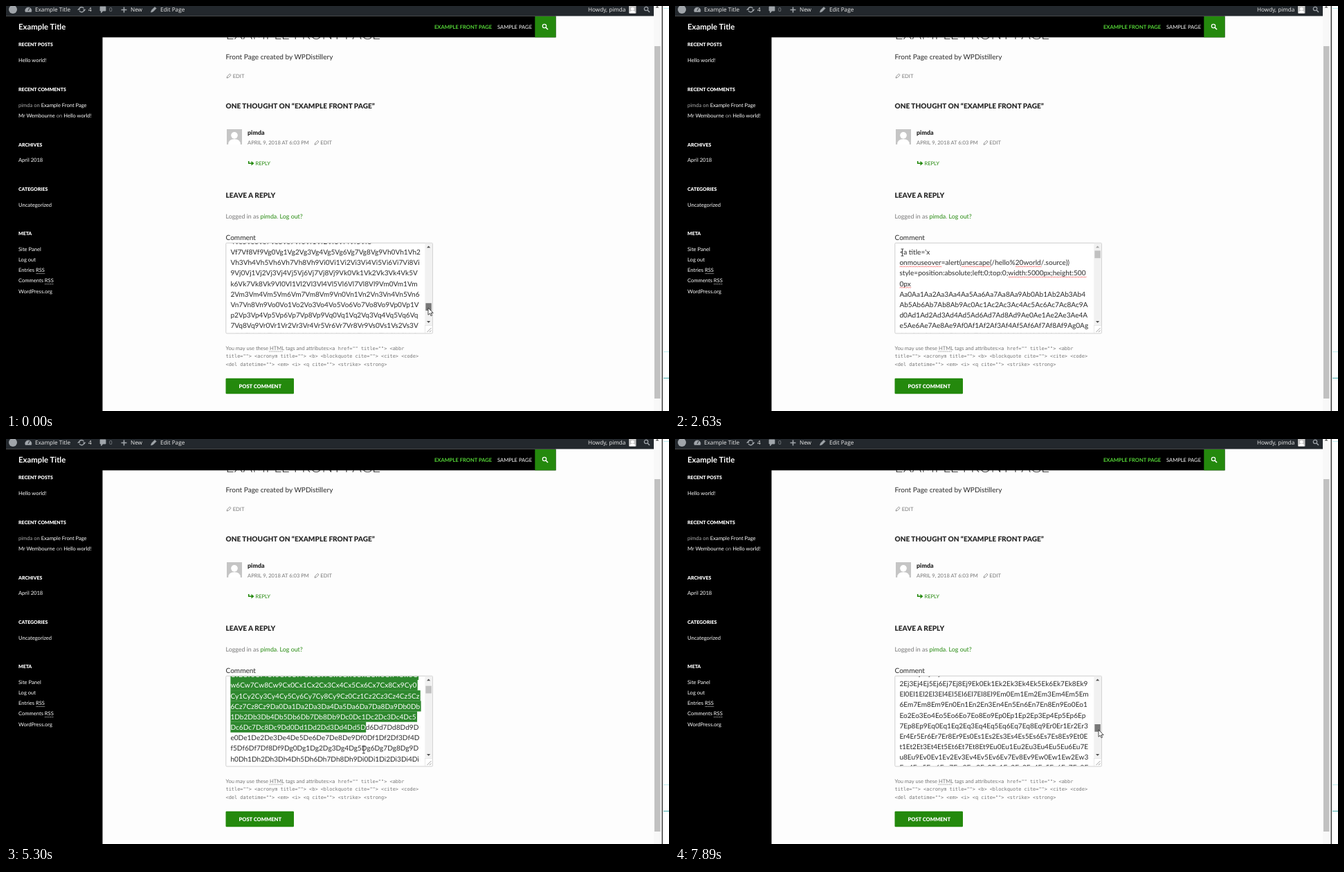
An HTML page for the animation above (8000 ms loop, 958 by 585 pixels).

```html
<!DOCTYPE html>
<html lang="en">
<head>
<meta charset="utf-8">
<title>Comment form</title>
<style>
html, body { margin: 0; width: 100%; height: 100%; overflow: hidden; background: #fdfdfd; }
svg { display: block; font-family: Lato, sans-serif; text-rendering: geometricPrecision; }
text { white-space: pre; }
.ui { font-family: "Open Sans", sans-serif; }
.mono { font-family: "DejaVu Sans Mono", monospace; font-size: 6.92px; }
</style>
</head>
<body>
<svg width="958" height="585" viewBox="0 0 958 585">
  <defs><clipPath id="box"><rect x="318" y="342.7" width="287.5" height="129.6"/></clipPath></defs>
  <g id="page"></g>
  <g id="lines" clip-path="url(#box)" font-size="10.11"></g>
  <g id="bar"></g>
  <g id="cursor"></g>
</svg>
<script>
const $ = id => document.getElementById(id);
const GREEN = '#24890d', GREY = '#767676', DARK = '#2b2b2b', USER = 'pimda';
const esc = s => s.replace(/&/g, '&amp;').replace(/</g, '&lt;');
const rect = (x, y, w, h, fill, more = '') => `<rect x="${x}" y="${y}" width="${w}" height="${h}" fill="${fill}" ${more}/>`;
const path = (d, color, width = 1, fill = 'none') => `<path d="${d}" stroke="${color}" stroke-width="${width}" fill="${fill}"/>`;
const text = (x, y, size, fill, body, more = '') => `<text x="${x}" y="${y}" font-size="${size}" fill="${fill}" ${more}>${body}</text>`;
const span = (fill, body) => `<tspan fill="${fill}">${body}</tspan>`;
const BOLD = 'font-weight="700"', BLACK = 'font-weight="900"', UI = 'class="ui"';

// ---------- static page ----------
const pencil = (x, y, c) => path(`M${x - 3} ${y + 3}l.8-2.4 3.6-3.6 1.7 1.7-3.6 3.6z`, c, .8);
const lens = (x, y, c) => `<circle cx="${x}" cy="${y}" r="2.7" fill="none" stroke="${c}" stroke-width="1.2"/>` +
  path(`M${x + 2} ${y + 2}l3 3`, c, 1.6);
const person = (x, y, s) => rect(x, y, s, s, '#c5c5c5') +
  `<circle cx="${x + s / 2}" cy="${y + s * .4}" r="${s * .22}" fill="#fff"/>` +
  `<path d="M${x + s * .1} ${y + s}q0-${s * .35} ${s * .4}-${s * .35}t${s * .4} ${s * .35}z" fill="#fff"/>`;
const dots = (x, y, w, c) => `<path d="M${x} ${y}h${w}" stroke="${c}" stroke-width=".7" stroke-dasharray="1 .6"/>`;

function page() {
  const side = [
    [58.4, 'RECENT POSTS'], [81, 'Hello world!'],
    [122.8, 'RECENT COMMENTS'], [145.6, span('#aaa', USER + ' on ') + 'Example Front Page'],
    [160.8, 'Mr Wembourne' + span('#aaa', ' on ') + 'Hello world!'],
    [202.5, 'ARCHIVES'], [225.2, 'April 2018'], [266.8, 'CATEGORIES'], [289.6, 'Uncategorized'],
    [331.4, 'META'], [354, 'Site Panel'], [369.1, 'Log out'], [384.3, 'Entries RSS'],
    [399.4, 'Comments RSS'], [414.6, 'WordPress.org']
  ].map(([y, s]) => /^[A-Z ]+$/.test(s) ? text(18, y, 6.95, '#fff', s, BLACK) : text(18, y, 7.58, '#fff', s)).join('');

  return text(317.5, 48, 20.86, DARK, 'EXAMPLE FRONT PAGE', 'font-weight="300"') +
    rect(0, 0, 936, 14.5, '#23282d') + rect(0, 14.5, 794.5, 30.8, '#000') + rect(0, 45, 139.5, 540, '#000') +
    // toolbar
    '<circle cx="10" cy="5" r="6" fill="#a0a5aa"/>' +
    path('M28 8.5a4.7 4.7 0 1 1 8.6 0z', '#a0a5aa', .5, '#a0a5aa') + path('M32 7l2-4', '#23282d', 1) +
    text(42, 8.4, 8.2, '#eee', 'Example Title', UI) +
    path('M105.5 5a3.8 3.8 0 0 1 7-1.5M113 5.5a3.8 3.8 0 0 1-7 1.5', '#a0a5aa', 1.4) +
    path('M111 4.8h4.4l-2.2 2.6zM103 5.8h4.4l-2.2-2.6z', 'none', 0, '#a0a5aa') +
    text(119, 8.4, 8.2, '#eee', '4', UI) +
    path('M136 1h8v6h-4l-2.5 3v-3h-1.5z', '#a0a5aa', .8, '#a0a5aa') + text(149, 8.4, 8.2, '#8b8f93', '0', UI) +
    path('M166.5 5.5h8M170.5 1.5v8', '#a0a5aa', 1.6) + text(180, 8.4, 8.2, '#eee', 'New', UI) +
    path('M209.5 9l1-3 4.5-4.5 2 2-4.5 4.5z', '#a0a5aa', .8, '#a0a5aa') + text(223, 8.4, 8.2, '#eee', 'Edit Page', UI) +
    text(841, 8.4, 8.2, '#eee', 'Howdy, ' + USER, UI) + person(900, 0, 10.5) + lens(925, 4, '#a0a5aa') +
    // header
    text(18, 34.3, 11.37, '#fff', 'Example Title', BOLD) +
    text(619, 32.8, 7.58, '#55d737', 'EXAMPLE FRONT PAGE', BOLD) + text(710, 32.8, 7.58, '#fff', 'SAMPLE PAGE') +
    rect(764.3, 15, 30.2, 30.3, GREEN) + lens(778, 29, '#fff') + side +
    dots(43.5, 386.5, 13, '#fff') + dots(56, 401.6, 13, '#fff') +
    // entry and thread
    text(317.5, 77.2, 10.11, DARK, 'Front Page created by WPDistillery') +
    pencil(322, 101, GREY) + text(327.7, 104, 7.58, GREY, 'EDIT') +
    text(317.5, 148.2, 10.11, DARK, 'ONE THOUGHT ON “EXAMPLE FRONT PAGE”', BLACK) +
    person(319, 178, 22) + text(349, 185.6, 8.85, DARK, USER, BLACK) +
    text(349, 200, 7.58, GREY, 'APRIL 9, 2018 AT 6:03 PM') + pencil(449, 197.3, GREY) + text(454.3, 200, 7.58, GREY, 'EDIT') +
    path('M350.7 224v3.2h5', GREEN, 1.6) + path('M354.5 224l4 3.2-4 3.2z', 'none', 0, GREEN) +
    text(360.4, 230.4, 7.58, GREEN, 'REPLY') +
    // reply form
    text(317.5, 277, 10.11, DARK, 'LEAVE A REPLY', BLACK) +
    text(317.5, 306.6, 8.85, GREY, `Logged in as ${span(GREEN, USER)}. ${span(GREEN, 'Log out?')}`) +
    text(317.5, 337.8, 10.11, DARK, 'Comment') +
    rect(317.8, 342.3, 298.7, 130.6, '#fff', 'stroke="#c4c4c4" stroke-width=".8" rx="1.3"') +
    text(317.5, 496.8, 7.58, GREY, 'You may use these HTML tags and attributes:') + dots(380, 499, 20, GREY) +
    text(467.2, 496.8, 6.92, GREY, esc('<a href="" title=""> <abbr'), 'class="mono"') +
    text(317.5, 508.2, 6.92, GREY, esc('title=""> <acronym title=""> <b> <blockquote cite=""> <cite> <code>'), 'class="mono"') +
    text(317.5, 519.6, 6.92, GREY, esc('<del datetime=""> <em> <i> <q cite=""> <strike> <strong>'), 'class="mono"') +
    rect(317.5, 537.8, 98.5, 22.4, GREEN, 'rx="1.2"') + text(336.4, 551.6, 7.58, '#fff', 'POST COMMENT', BLACK) +
    // window edge
    rect(936, 0, 11, 585, '#f8f8f8') + rect(937, 58, 8.5, 509, '#c1c1c1') +
    path('M938.6 2.5l2.4-2.4 2.4 2.4z', 'none', 0, '#505050') +
    rect(947.6, 0, 1.4, 585, '#333') + rect(949, 0, 9, 585, '#fff') +
    path('M950 3.5h8M950 499.5h8', '#bfeef0', 1) + path('M950 537.5h8', '#4aa', 1);
}

// ---------- comment text ----------
const LINE = 15.168, LEFT = 324.4, TOP = 347.7, MAXW = 275.2;
const pen = document.createElement('canvas').getContext('2d');
pen.font = '160px Lato, sans-serif';
const cache = {};
const raw = s => cache[s] ??= pen.measureText(s).width * 10.11 / 160;
const step = (s, i) => i + 1 < s.length ? raw(s[i] + s[i + 1]) - raw(s[i + 1]) : raw(s[i]);
const width = s => [...s].reduce((w, _, i) => w + step(s, i), 0);

let cycle = '';
for (let a = 0; a < 26; a++) for (let b = 0; b < 26; b++) for (let n = 0; n < 10; n++)
  cycle += String.fromCharCode(65 + a, 97 + b) + n;
const body = cycle.repeat(4).slice(0, 65400);
const head = ["<a title='x", 'onmouseover=alert(unescape(/hello%20world/.source))',
  'style=position:absolute;left:0;top:0;width:5000px;height:500', '0px'];
const misspelt = [[1, 'onmouseover'], [1, 'unescape'], [1, '20world'], [2, 'width:5000px;height:500'], [3, '0px']];

// Known line starts keep the wrapping in step.
const at = (s, n) => cycle.indexOf(s) + n * cycle.length;
const starts = [at('0Au1', 0), at('1El2', 0), at('Hq8', 0), at('2Ej3', 2), at('Vf7', 2)];
const lines = [...head], rowOf = {};
for (let pos = 0; pos < body.length;) {
  const stop = starts.find(s => s > pos) ?? body.length;
  let w = 0, end = pos;
  while (end < stop && w + raw(body[end]) <= MAXW) w += step(body, end++);
  rowOf[pos] = lines.length;
  lines.push(body.slice(pos, end));
  pos = end;
}
const [rA, rE, rH, rJ, rV] = starts.map(s => rowOf[s]);
const MAXSCROLL = lines.length * LINE - 121;

// ---------- motion: time, scroll, pointer x y, selection x and row ----------
const keys = [
  [0, rV * LINE, 610, 436, 0, -1],
  [1240, (rE + 2) * LINE - 2, 613, 363, 0, -1],
  [1650, 0, 613, 357, 0, -1],
  [2000, 0, 612, 358, 0, -1],
  [2260, 0, 560, 386, 0, -1],
  [2630, 0, 328.5, 356, 0, -1],
  [2700, 0, 328.5, 356, 326, 0],
  [3330, 0, 400, 388, 400, 2.5],
  [3900, 0, 500, 452, 500, 7],
  [4720, rA * LINE, 517.5, 449, 517, rA + 6.01],
  [5750, rE * LINE + 5.2, 516.5, 449, 516, rE + 4.01],
  [6580, rH * LINE + 5.3, 564.5, 420, 514, rH + 7.01],
  [6850, (rH + 18) * LINE, 566, 422, 540, rH + 24],
  [7120, (rH + 18) * LINE, 600, 385, 540, rH + 24],
  [7270, (rH + 24) * LINE, 611, 369, 540, rH + 24],
  [7890, rJ * LINE + 2, 612, 420, 540, rH + 24]
];
const ticks = [0];
for (const [from, to, n] of [[140, 1110, 8], [1240, 2260, 8], [2380, 2630, 3], [2760, 3330, 5], [3480, 4450, 8],
  [4570, 4720, 2], [4840, 5450, 5], [5750, 5910, 2], [6180, 6580, 4], [6710, 7120, 4], [7270, 7890, 5]])
  for (let i = 0; i < n; i++) ticks.push(Math.round(from + (to - from) * i / (n - 1)));

function pose(t) {
  const i = Math.max(1, keys.findIndex(k => k[0] >= t));
  const a = keys[i - 1], b = keys[i], u = (t - a[0]) / (b[0] - a[0]);
  return a.map((v, j) => v + (b[j] - v) * u);
}

function charAt(s, x) {
  let w = 0, i = 0;
  while (i < s.length && w + step(s, i) / 2 < x) w += step(s, i++);
  return i;
}

function wave(x, y, w) {
  let d = `M${x} ${y}`;
  for (let i = 0; i < w / 1.3; i++) d += `l1.3 ${i % 2 ? 1 : -1}`;
  return path(d, '#f33', .6);
}

function drawLines(scroll, selX, selRow) {
  const first = Math.max(0, Math.floor(scroll / LINE) - 1), last = Math.floor(selRow);
  let out = '';
  for (let r = first; r < first + 12 && r < lines.length; r++) {
    const s = lines[r], y = TOP + r * LINE - scroll, base = y + 11.4;
    const n = r < last ? s.length : r > last ? 0 : charAt(s, selX - LEFT);
    if (n) out += rect(LEFT, y, width(s.slice(0, n)) + (r < last ? 1 : 0), LINE + .1, '#2e882e');
    out += text(LEFT, base, 10.11, DARK, n ? span('#fff', esc(s.slice(0, n))) + esc(s.slice(n)) : esc(s));
    for (const [row, word] of misspelt) if (row === r)
      out += wave(LEFT + width(s.slice(0, s.indexOf(word))), base + 2.6, width(word));
  }
  $('lines').innerHTML = out;
}

function drawBar(scroll, held) {
  const y = 353.4 + 86.4 * scroll / MAXSCROLL;
  $('bar').innerHTML = rect(605.3, 342.7, 10.8, 118.8, '#f1f1f1') +
    path('M608 349.3l2.6-2.8 2.6 2.8z', 'none', 0, scroll > 1 ? '#505050' : '#a3a3a3') +
    path('M608 454.9l2.6 2.8 2.6-2.8z', 'none', 0, '#505050') +
    rect(606.4, y, 8.4, 10.8, held ? '#787878' : '#c1c1c1') +
    rect(605.3, 461.5, 10.8, 10.8, '#fff', 'stroke="#ddd" stroke-width=".6"') +
    path('M608.5 471l6-6M612 471l2.5-2.5', '#888', .8);
}

function drawCursor(x, y) {
  $('cursor').innerHTML = x > 604
    ? path(`M${x} ${y}v10.2l2.4-2.2 1.6 3.6 1.6-.7-1.6-3.5h3.2z`, '#222', .8, '#fff')
    : path(`M${x - 2} ${y - 5}h4M${x} ${y - 5}v10M${x - 2} ${y + 5}h4`, '#333', .9);
}

let shown = -1;
function frame(now) {
  const t = now % 8000, tick = ticks.findLast(k => k <= t);
  if (tick !== shown) {
    shown = tick;
    const [, scroll, x, y, selX, selRow] = pose(tick);
    drawLines(scroll, selX, tick < 2700 ? -1 : selRow);
    drawBar(scroll, tick < 2000 || tick >= 7270);
    drawCursor(x, y);
  }
  requestAnimationFrame(frame);
}
$('page').innerHTML = page();
requestAnimationFrame(frame);
</script>
</body>
</html>
```
